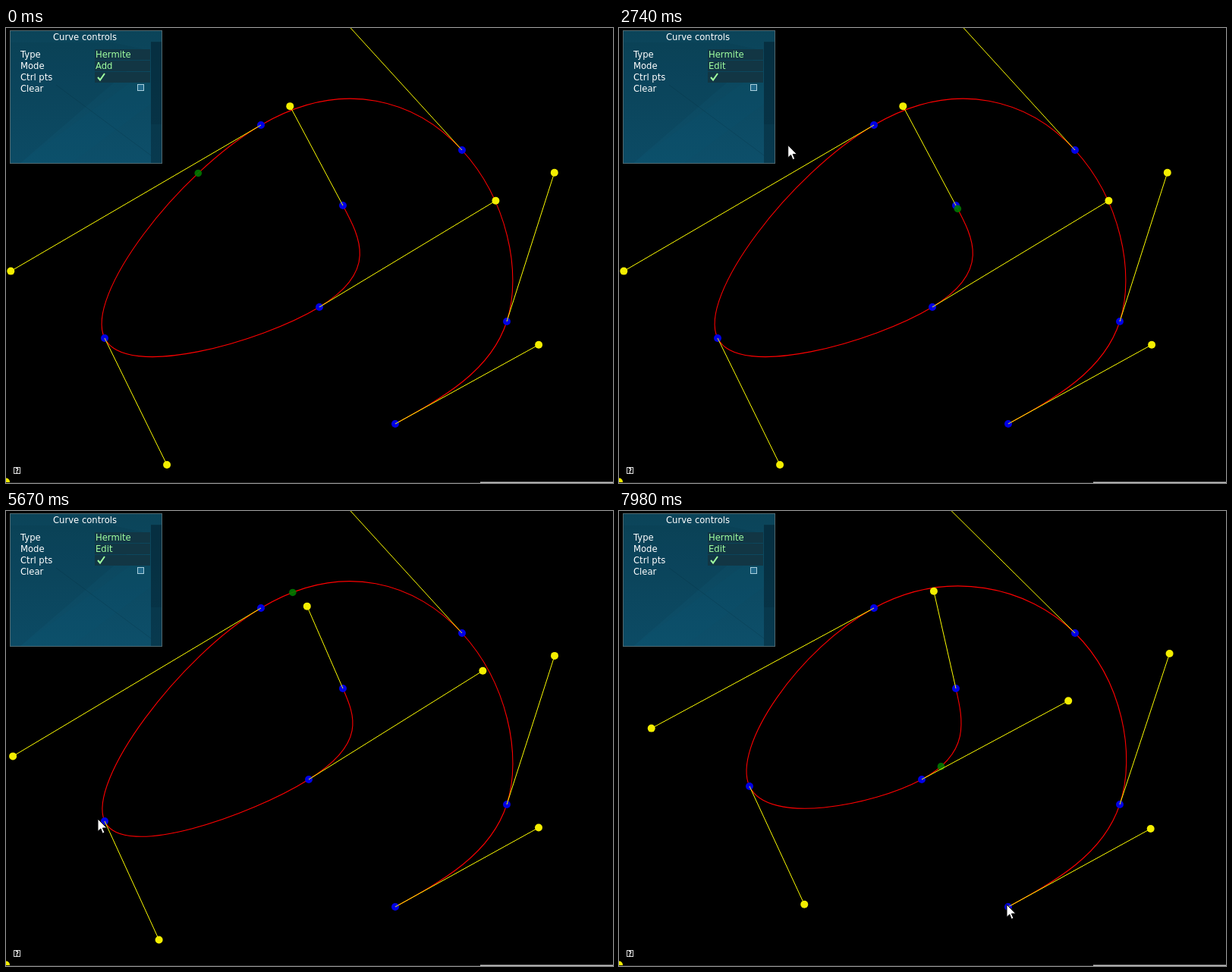
These frames come from a looping animation (800x600 px, 8000 ms). An HTML page with a canvas:

```html
<!DOCTYPE html>
<html lang="en">
<head>
<meta charset="utf-8">
<title>Curve controls</title>
<style>
  html, body { margin: 0; width: 100%; height: 100%; overflow: hidden; background: #000; }
  canvas { display: block; }
</style>
</head>
<body>
<canvas id="stage" width="800" height="600"></canvas>
<script>
const ctx = document.getElementById('stage').getContext('2d');
const LOOP = 8000;
const FONT = '11.6px "DejaVu Sans", sans-serif';
const ROW = 15;

// The pointer enters from below, switches the mode, then drags two knots
const pointerStart = [674, 580];
const pointerMoves = [
  { from: 120, to: 900, at: [142, 50] },
  { from: 1250, to: 1690, at: [168, 75] },
  { from: 1690, to: 1900, at: [160, 84] },
  { from: 2400, to: 3450, at: [413, 368] },
  { from: 3800, to: 4720, at: [370, 324] },
  { from: 4760, to: 5200, at: [399, 354] },
  { from: 5260, to: 5650, at: [121, 406] },
  { from: 5750, to: 5950, at: [130, 409] },
  { from: 6400, to: 6600, at: [136, 394] },
  { from: 6600, to: 7030, at: [172, 363] },
  { from: 7100, to: 7480, at: [537, 547] },
  { from: 7540, to: 7940, at: [511, 519] }
];
const openClick = [980, 1100], editClick = [1850, 1970];
const firstDrag = [3760, 5250], secondDrag = [6350, 7090];
const presses = [openClick, editClick, firstDrag, secondDrag];
const popupSpan = [openClick[1], editClick[1]];
const DRAG_LAG = 70;

const inside = (t, [a, b]) => t >= a && t < b;
const clamp = (v, a, b) => Math.min(b, Math.max(a, v));
const smooth = s => s * s * (3 - 2 * s);
const mix = (a, b, s) => a.map((v, k) => v + (b[k] - v) * s);
const cursorArrow = new Path2D('M0 0V16.5L3.8 13 6.3 19.2 9 18.1 6.4 12H11.8Z');

const pointerAt = t => pointerMoves.reduce(
  (pos, { from, to, at }) => mix(pos, at, smooth(clamp((t - from) / (to - from), 0, 1))),
  pointerStart);

function knotsAt(t) {
  const dragged = span => pointerAt(clamp(t - DRAG_LAG, ...span));
  return [[444, 234], dragged(firstDrag), dragged(secondDrag),
    [336, 128], [601, 161], [660, 387], [513, 522]];
}

// Tangents of the natural cubic spline (tridiagonal solve)
function tangents(p) {
  const n = p.length - 1, c = [], m = [];
  for (let i = 0; i <= n; i++) {
    const prev = i ? m[i - 1] : [0, 0];
    const w = (i === 0 || i === n ? 2 : 4) - (i ? c[i - 1] : 0);
    c[i] = 1 / w;
    m[i] = prev.map((v, k) =>
      (3 * (p[Math.min(i + 1, n)][k] - p[Math.max(i - 1, 0)][k]) - v) / w);
  }
  for (let i = n - 1; i >= 0; i--) m[i] = m[i].map((v, k) => v - c[i] * m[i + 1][k]);
  return m;
}

function pointOn(p, m, u) {
  const i = Math.min(Math.floor(u), p.length - 2), s = u - i, r = 1 - s;
  return mix(p[i], p[i + 1], smooth(s))
    .map((v, k) => v + s * r * (r * m[i][k] - s * m[i + 1][k]));
}

function rect(color, x, y, w, h) {
  ctx.fillStyle = color;
  ctx.fillRect(x, y, w, h);
}
function frame(color, x, y, w, h) {
  ctx.strokeStyle = color;
  ctx.lineWidth = 1;
  ctx.strokeRect(x + .5, y + .5, w - 1, h - 1);
}
function disc(color, [x, y], r) {
  ctx.fillStyle = color;
  ctx.beginPath();
  ctx.arc(x, y, r, 0, 2 * Math.PI);
  ctx.fill();
}
function line(color, width, ...pts) {
  ctx.strokeStyle = color;
  ctx.lineWidth = width;
  ctx.beginPath();
  pts.forEach(q => ctx.lineTo(...q));
  ctx.stroke();
}
function poly(color, ...pts) {
  ctx.fillStyle = color;
  ctx.beginPath();
  pts.forEach(q => ctx.lineTo(...q));
  ctx.fill();
}
function label(text, x, y, color = '#fff') {
  ctx.font = FONT;
  ctx.fillStyle = color;
  ctx.fillText(text, x, y);
}
function vertical(y0, y1, from, to) {
  const g = ctx.createLinearGradient(0, y0, 0, y1);
  g.addColorStop(0, from);
  g.addColorStop(1, to);
  return g;
}
function highlight(x, y, w, from, to) {
  rect(vertical(y, y + ROW - 1, from, to), x, y, w, ROW - 1);
  rect('#b9c9cf', x, y + ROW - 1, w, 1);
}

function drawCurve(t) {
  const p = knotsAt(t), m = tangents(p);
  const handle = (i, sign) => p[i].map((v, k) => v + sign * m[i][k] / 3);
  ctx.lineWidth = 1.1;
  ctx.strokeStyle = '#f00';
  ctx.beginPath();
  ctx.moveTo(...p[0]);
  for (let i = 1; i < p.length; i++)
    ctx.bezierCurveTo(...handle(i - 1, 1), ...handle(i, -1), ...p[i]);
  ctx.stroke();
  p.forEach(q => disc('#0000e6', q, 5));

  // The marker runs backwards along the spline, about one segment a second
  const segments = p.length - 1;
  const u = ((2.75 - .000991 * t) % segments + segments) % segments;
  disc('rgba(0,125,0,.88)', pointOn(p, m, u), 4.8);

  p.forEach((q, i) => {
    const end = q.map((v, k) => v - m[i][k]);
    line('#ff0', 1, q, end);
    disc('#f4ee00', end, 5);
  });
  disc('#f4ee00', [0, 598.5], 5);
}

function drawPanel(t, popup, [px, py]) {
  rect(vertical(3, 179, '#0b4459', '#0d4f6a'), 5, 3, 201, 176);
  poly('rgba(0,25,40,.08)', [6, 19], [140, 19], [191, 30], [19, 178], [6, 178]);
  poly('rgba(0,90,120,.1)', [19, 178], [191, 52], [191, 100], [86, 178]);
  line('rgba(0,25,40,.16)', 1, [66, 75], [191, 168]);
  rect('rgba(0,25,38,.4)', 191, 18, 14, 160);
  rect('rgba(0,22,34,.15)', 191, 19, 14, 108);
  if (popup) rect('rgba(0,10,20,.25)', 5, 3, 201, 176);
  for (let row = 0; row < 3; row++) rect('#123644', 117, 28 + row * ROW, 73, 14);

  const hovered = px > 19 && px < 191 ? Math.floor((py - 27) / ROW) : -1;
  const row = popup ? 1 : hovered;
  if (row >= 0 && row < 4) highlight(19, 27 + row * ROW, 171, '#5b7681', '#17323d');

  label('Curve controls', 62, 16);
  ['Type', 'Mode', 'Ctrl pts', 'Clear'].forEach((s, i) => label(s, 19, 39 + i * ROW));
  const green = popup ? '#8fdc91' : '#a0ffa0';
  label('Hermite', 118, 39, green);
  label(t < popupSpan[1] ? 'Add' : 'Edit', 118, 54, green);
  line(green, 2, [121, 65], [124, 68.5], [130, 60]);
  rect('#21698a', 173, 74, 9, 9);
  frame('#a9cfdd', 173, 74, 9, 9);
  frame('#50686f', 5, 3, 201, 176);
}

function drawPopup() {
  rect(vertical(56, 127, '#0c3f52', '#0f5a78'), 116, 56, 173, 71);
  rect('#0b364a', 274, 57, 14, 69);
  frame('#50686f', 116, 56, 173, 71);
  highlight(130, 61, 142, '#a0b0b7', '#567883');
  label('Add', 130, 73, '#a0ff90');
  label('Edit', 130, 88);
}

function drawCorner() {
  rect('#222', 0, 599, 625, 1);
  rect('#c4c4c4', 625, 598.5, 175, 1.5);
  frame('#ddd', 10, 579, 9, 9);
  ctx.font = 'bold 8px "DejaVu Sans", sans-serif';
  ctx.fillStyle = '#fff';
  ctx.fillText('?', 12.2, 586.6);
}

function drawPointer(t, at) {
  if (t < pointerMoves[0].from) return;
  if (presses.some(span => inside(t, span))) disc('rgba(255,240,0,.5)', at, 12);
  ctx.save();
  ctx.translate(...at);
  ctx.lineWidth = 1;
  ctx.strokeStyle = '#000';
  ctx.fillStyle = '#fff';
  ctx.fill(cursorArrow);
  ctx.stroke(cursorArrow);
  ctx.restore();
}

function draw(now) {
  const t = now % LOOP, at = pointerAt(t), popup = inside(t, popupSpan);
  rect('#000', 0, 0, 800, 600);
  drawCurve(t);
  drawCorner();
  drawPanel(t, popup, at);
  if (popup) drawPopup();
  drawPointer(t, at);
  requestAnimationFrame(draw);
}
requestAnimationFrame(draw);
</script>
</body>
</html>
```
